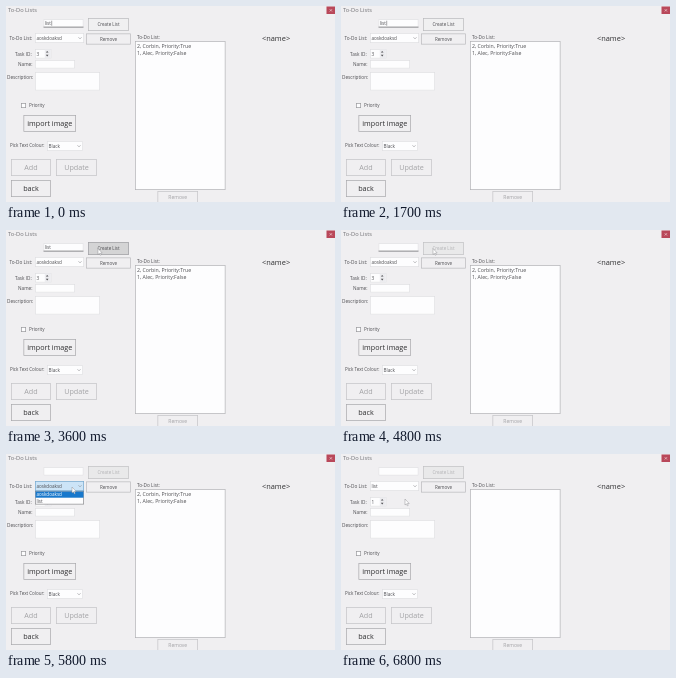
Recreate the animation shown at these times as an HTML page with a canvas. Size 329 px wide and 196 px high, loop 7.2 s.

```html
<!DOCTYPE html>
<html lang="en">
<head>
<meta charset="utf-8">
<title>To-Do Lists</title>
<style>
html, body { margin: 0; width: 100%; height: 100%; overflow: hidden; background: #f0eff1; }
canvas { display: block; width: 329px; height: 196px; }
</style>
</head>
<body>
<canvas id="stage"></canvas>
<script>
const LOOP = 7200, STEP = 100;
const FACE = '#f0eff1', FIELD = '#fdfdfe', INK = '#4c4c50', FAINT = '#dfdee2';
const canvas = document.getElementById('stage');
const ctx = canvas.getContext('2d');
const scale = window.devicePixelRatio || 1;
canvas.width = 329 * scale;
canvas.height = 196 * scale;

// Pointer keys: time, x, y
const pointerPath = [
  [2100, 132, 49], [2800, 87, 15], [2900, 85.5, 13.5], [3600, 92, 18.5],
  [4800, 92, 18.5], [5500, 66, 33], [5800, 66, 33], [6300, 64, 45], [7200, 64, 45]
];

function rect(x, y, w, h, fill) {
  ctx.fillStyle = fill;
  ctx.fillRect(x, y, w, h);
}

function box(x, y, w, h, fill = FIELD, border = FAINT) {
  rect(x, y, w, h, fill);
  ctx.strokeStyle = border;
  ctx.lineWidth = 0.7;
  ctx.strokeRect(x + 0.35, y + 0.35, w - 0.7, h - 0.7);
}

function text(str, x, y, size = 4.7, color = INK, align = 'left') {
  ctx.font = `${size}px "Open Sans", sans-serif`;
  ctx.fillStyle = color;
  ctx.textAlign = align;
  ctx.fillText(str, x, y);
}

function button(label, x, y, w, h, { size = 4.5, fill = FACE, border = '#b9b9bc', color = INK } = {}) {
  box(x, y, w, h, fill, border);
  text(label, x + w / 2, y + h / 2 + size * 0.34, size, color, 'center');
}

function line(points, color, width) {
  ctx.beginPath();
  points.forEach(([x, y]) => ctx.lineTo(x, y));
  ctx.strokeStyle = color;
  ctx.lineWidth = width;
  ctx.stroke();
}

function chevron(x, y) {
  line([[x - 1.5, y - 0.7], [x, y + 0.8], [x + 1.5, y - 0.7]], '#88888c', 0.6);
}

function spinArrow(x, y, d) {
  ctx.fillStyle = '#4c4c50';
  ctx.beginPath();
  ctx.moveTo(x - 1.3, y - 0.8 * d);
  ctx.lineTo(x + 1.3, y - 0.8 * d);
  ctx.lineTo(x, y + 0.9 * d);
  ctx.fill();
}

function combo(label, x, y, w, h, fill, border) {
  box(x, y, w, h, fill, border);
  text(label, x + 1.5, y + h / 2 + 1.6, 4.6);
  chevron(x + w - 4, y + h / 2);
}

function drawWindow() {
  rect(0, 0, 329, 196, FACE);
  text('To-Do Lists', 2, 6, 5.7, '#707074');
  rect(320.5, 0.5, 8.5, 7.5, '#b9485a');
  line([[323.7, 3.2], [326, 5.5]], '#f6dfe3', 0.6);
  line([[326, 3.2], [323.7, 5.5]], '#f6dfe3', 0.6);

  text('To-Do List:', 3.5, 34);
  text('Task ID:', 9, 50);
  text('Name:', 12, 60);
  text('Description:', 1, 72.5);
  text('Priority', 23, 101.3, 4.6);
  text('Pick Text Colour:', 4, 141, 4.5);
  text('To-Do List:', 131, 32.5);
  text('<name>', 256, 34.5, 7.4, '#2e2e30');

  box(29, 54, 40, 8.5);
  box(29, 66, 65, 18.5);
  box(15, 97, 5, 5, FIELD, '#98989c');
  combo('Black', 41, 135, 36, 10);

  const big = { size: 7.2, border: '#a8a8ac', color: '#2e2e30' };
  const disabled = { size: 7.2, border: '#c4c4c7', color: '#a2a2a5' };
  button('import image', 17.5, 109, 52.5, 17, big);
  button('Add', 5, 153, 40, 17, disabled);
  button('Update', 50, 153, 41, 17, disabled);
  button('back', 5, 174, 40, 17, big);
  button('Remove', 80, 27.5, 45, 11);
  button('Remove', 151.5, 185, 40.5, 12, { ...disabled, size: 5 });
}

function drawList(selected) {
  box(129, 35, 90.5, 149, FIELD, '#b0b0b4');
  if (selected) return;
  text('2, Corbin, Priority:True', 131, 42, 5.2);
  text('1, Alec, Priority:False', 131, 49, 5.2);
}

function drawCreateRow(t) {
  const cleared = t >= 4200, focused = t < 5600;
  box(37.5, 13, 40, 8.5);
  if (focused) rect(37.5, 20.7, 40, 0.8, '#77777b');
  if (!cleared) text('list', 38.7, 19.1, 4.6);
  const caretOn = t < 100 || (t >= 600 && t < 1100) || (t >= 1700 && t < 2200) || (t >= 2700 && t < 3200);
  if (caretOn) rect(45.6, 14.7, 0.5, 5, INK);

  const hover = Math.min(1, Math.max(0, (t - 2900) / 300));
  const shade = cleared ? 233 : 240 - 28 * hover;
  button('Create List', 82, 12, 41, 13, {
    fill: `rgb(${shade},${shade},${shade + 1})`,
    border: cleared ? '#c2c2c5' : hover ? '#a0a0a4' : '#b9b9bc',
    color: cleared ? '#b2b2b5' : INK
  });
}

function drawSelector(t) {
  const selected = t >= 6400, open = t >= 5600 && !selected;
  box(29, 43, 16.5, 9.5);
  text(selected ? '1' : '3', 30.5, 49.7);
  rect(38.8, 43.5, 6, 8.5, '#ececef');
  spinArrow(41.2, 45.8, -1);
  spinArrow(41.2, 49.6, 1);
  combo(selected ? 'list' : 'aoskdoaksd', 29, 27, 49, 10,
    open ? '#cce4f7' : FIELD, open ? '#78a9cd' : FAINT);
  if (!open) return;
  box(29, 37, 49, 13.5, FIELD, '#88888c');
  const active = t >= 6200 ? 1 : 0;
  rect(29.5, 37.5 + active * 6.3, 48, 6.2, '#1878cc');
  ['aoskdoaksd', 'list'].forEach((item, i) =>
    text(item, 30.5, 42.3 + i * 6.3, 4.6, i === active ? '#fff' : INK));
}

function drawPointer(t) {
  if (t < pointerPath[0][0]) return;
  const next = Math.max(1, pointerPath.findIndex(key => key[0] >= t));
  const [t0, x0, y0] = pointerPath[next - 1];
  const [t1, x1, y1] = pointerPath[next];
  const p = (t - t0) / (t1 - t0), eased = p * p * (3 - 2 * p);
  ctx.save();
  ctx.translate(x0 + (x1 - x0) * eased, y0 + (y1 - y0) * eased);
  const arrow = new Path2D('M0 0V6L1.4 4.8 2.3 6.8 3.2 6.4 2.4 4.5H4.2Z');
  ctx.fillStyle = '#fff';
  ctx.fill(arrow);
  ctx.strokeStyle = '#8a8a8e';
  ctx.lineWidth = 0.45;
  ctx.stroke(arrow);
  ctx.restore();
}

function draw() {
  const t = Math.floor((performance.now() % LOOP) / STEP) * STEP;
  ctx.setTransform(scale, 0, 0, scale, 0, 0);
  drawWindow();
  drawList(t >= 6400);
  drawCreateRow(t);
  drawSelector(t);
  drawPointer(t);
  requestAnimationFrame(draw);
}
draw();
</script>
</body>
</html>
```
